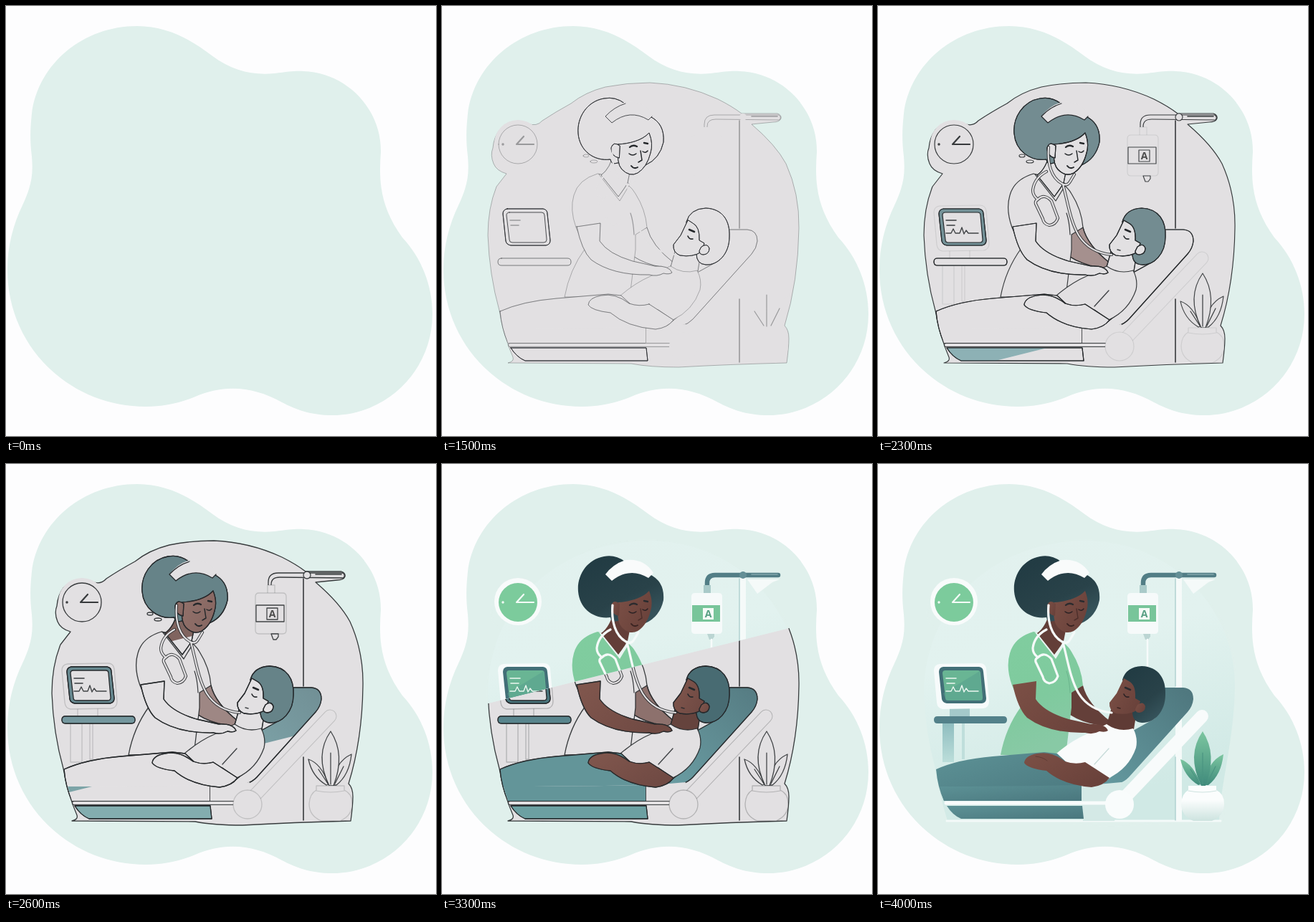
Recreate the animation shown at these times as an HTML page. Size 600x600 px, loop 7000 ms.

```html
<!DOCTYPE html>
<html lang="en">
<head>
<meta charset="utf-8">
<title>Bedside care</title>
<style>
html, body { margin: 0; width: 100%; height: 100%; overflow: hidden; background: #fdfdfe; }
svg { display: block; width: 100vw; height: 100vh; }
path { stroke-linecap: round; stroke-linejoin: round; }
.l1 { stroke-opacity: var(--l1); }
.l2 { stroke-opacity: var(--l2); }
.l3 { stroke-opacity: var(--l3); }
.l4 { stroke-opacity: var(--l4); }
.line { stroke: #25282b; stroke-width: var(--w); }
.tint { opacity: var(--tint); }
text { font: bold 14px "Open Sans", sans-serif; text-anchor: middle; }
</style>
</head>
<body>
<svg viewBox="0 0 600 600">
  <defs id="defs">
    <linearGradient id="room" x1="0" y1="0" x2=".25" y2="1">
      <stop offset="0" stop-color="#e2f1ee"/><stop offset=".45" stop-color="#e2f2ef"/><stop offset="1" stop-color="#d0e9e5"/>
    </linearGradient>
    <linearGradient id="hair" x1="0" y1="0" x2=".6" y2="1">
      <stop offset="0" stop-color="#203a42"/><stop offset=".7" stop-color="#294249"/><stop offset="1" stop-color="#35525a"/>
    </linearGradient>
    <linearGradient id="skin" x1="0" y1="0" x2="1" y2=".6">
      <stop offset="0" stop-color="#7c5046"/><stop offset="1" stop-color="#6a423b"/>
    </linearGradient>
    <linearGradient id="scrub" x1="0" y1="0" x2=".25" y2="1">
      <stop offset="0" stop-color="#80cd9f"/><stop offset=".6" stop-color="#7fca9e"/><stop offset="1" stop-color="#88c9a5"/>
    </linearGradient>
    <linearGradient id="teal" x1="0" y1="0" x2="1" y2="1">
      <stop offset="0" stop-color="#5d9296"/><stop offset="1" stop-color="#4a777e"/>
    </linearGradient>
    <linearGradient id="rest" x1="1" y1="0" x2="0" y2="1">
      <stop offset="0" stop-color="#4e767d"/><stop offset="1" stop-color="#649aa0"/>
    </linearGradient>
    <linearGradient id="leaf" x1="0" y1="0" x2="0" y2="1">
      <stop offset="0" stop-color="#7cc6a0"/><stop offset="1" stop-color="#3f8a7b"/>
    </linearGradient>
    <linearGradient id="pot" x1="0" y1="0" x2="0" y2="1">
      <stop offset=".4" stop-color="#fbfdfd"/><stop offset="1" stop-color="#cde3df"/>
    </linearGradient>
    <linearGradient id="leg" x1="0" y1="0" x2="0" y2="1">
      <stop offset="0" stop-color="#8fbdbf"/><stop offset="1" stop-color="#bcdeda"/>
    </linearGradient>
  </defs>
  <path fill="#e0f0ec" d="M183 28C225 28 258 47 287 69C316 91 345 97 375 94C395 91 408 90 415 91C475 93 524 143 523 204C520 245 522 280 553 323C580 352 595 390 595 430C595 508 532 571 455 571C425 571 404 563 385 553C345 531 305 527 262 546C240 555 218 559 195 559C88 559 2 475 2 368C2 335 10 305 23 278C36 250 38 235 36 210C33 185 34 170 36 150C45 80 108 28 183 28Z"/>
  <g id="sketch" clip-path="url(#wipe-base)"></g>
  <g id="art" clip-path="url(#wipe-color)"></g>
</svg>
<script>
const $ = id => document.getElementById(id);
const PAPER = '#e2e0e2', INK = '#25282b';
const SKIN = 'url(#skin)', HAIR = 'url(#hair)', TEAL = 'url(#teal)';
const sketch = [], art = [];

// Straight wipes sliding down: the edge starts at y = from (x = 0) at time t0.
const wipes = {
  base:  { t0: 400,  from: 170, speed: .8 },
  dark:  { t0: 1900, from: 272, speed: .66 },
  mid:   { t0: 2300, from: 360, speed: .4 },
  skin:  { t0: 2900, from: 440, speed: .45 },
  color: { t0: 2900, from: 190, speed: .4 }
};

// Closed area: outline in the drawing, optional tint, full colour in the end.
function area(d, fill, line, wipe, tint = fill) {
  sketch.push(`<path d="${d}" fill="${PAPER}" class="${line ? 'line l' + line : ''}"/>`);
  if (wipe) sketch.push(`<g clip-path="url(#wipe-${wipe})"><path class="tint" d="${d}" fill="${tint}"/></g>`,
    line ? `<path d="${d}" fill="none" class="line l${line}"/>` : '');
  art.push(`<path d="${d}" fill="${fill}"/>`);
}
// Thick stroke whose drawing shows both edges.
function tube(d, color, w, line) {
  sketch.push(`<path d="${d}" fill="none" stroke="${INK}" stroke-width="${w + 1}" class="l${line}"/>`,
    `<path d="${d}" fill="none" stroke="${PAPER}" stroke-width="${w - 1}"/>`);
  art.push(`<path d="${d}" fill="none" stroke="${color}" stroke-width="${w}"/>`);
}
function outline(d, line) {
  sketch.push(`<path d="${d}" fill="none" class="line l${line}"/>`);
}
function mark(d, color, w, line) {
  if (line) sketch.push(`<path d="${d}" fill="none" stroke="${INK}" stroke-width="${w}" class="l${line}"/>`);
  art.push(`<path d="${d}" fill="none" stroke="${color}" stroke-width="${w}"/>`);
}
const disc = (x, y, r, ry = r) => `M${x - r} ${y}a${r} ${ry} 0 1 1 ${2 * r} 0a${r} ${ry} 0 1 1 ${-2 * r} 0Z`;
const box = (x, y, w, h, r) =>
  `M${x + r} ${y}h${w - 2 * r}q${r} 0 ${r} ${r}v${h - 2 * r}q0 ${r} ${-r} ${r}h${2 * r - w}q${-r} 0 ${-r} ${-r}v${2 * r - h}q0 ${-r} ${r} ${-r}Z`;

// Room
const scene = 'M120 164Q132 169 140 160Q158 148 180 136Q200 120 228 113Q258 107 290 107Q340 109 385 130Q405 140 418 150H468Q474 152 473 157Q471 162 462 162L432 165Q466 194 480 220Q499 262 498 310Q497 385 478 446Q484 452 484 464Q484 476 481 498Q400 500 330 504Q290 504 264 499L92 498Q101 496 99 490Q86 460 80 425Q66 375 64 320Q64 282 76 252L90 234Q76 230 72 220Q67 208 71 198Q72 184 80 173Q92 160 108 161Z';
sketch.push(`<path d="${scene}" fill="${PAPER}" class="line l2"/>`);
art.push(`<path d="${scene}" fill="#e0f0ec" stroke="#e0f0ec" stroke-width="3"/>`,
  '<path d="M64 320C64 200 160 107 290 107C410 108 498 200 498 310C497 385 478 446 476 498H97Q84 455 80 425Q66 375 64 320Z" fill="url(#room)"/>',
  '<path d="M426 161H471L461 165L440 181Z" fill="#f5faf9"/>',
  '<path d="M96 498H478" stroke="#f4faf9" stroke-width="3"/>');

// Clock
area(disc(106, 192, 33), '#f8fbfb', 0);
area(disc(106, 193, 27), '#7ccb9c', 2);
mark('M128 193H104L114 182', '#f4fbf7', 2.2, 2);
mark(disc(85, 193, 1), '#f4fbf7', 1.5, 2);

// Monitor and shelf
area('M90 362H106V416H90Z', 'url(#leg)', 4);
area('M117 362H121V412H117Z', '#bfdedb', 4);
area('M100 336H128V353H100Z', '#a4c9ca', 4);
area('M86 279L142 278Q150 278 151 286L155 331Q155 340 147 341L90 342Q83 341 82 333L78 288Q78 280 86 279Z', '#f7fbfb', 4);
area('M91 283L141 283Q147 284 147 290L151 327Q151 333 145 334L96 334Q90 333 89 328L85 290Q85 284 91 283Z', '#426f77', 1, 'dark');
area('M94 288H139Q143 288 143 292L146 326Q146 330 142 330H98Q94 330 94 326L90 292Q90 288 94 288Z', '#69b594', 1);
art.push('<path d="M91 320L142 289L146 330H95Z" fill="#579e8d" opacity=".5"/>');
mark('M95 299H109M96 306H107', '#edf7f1', 1.6, 2);
mark('M95 317H102L105 311L108 317H114L117 309L120 318L123 313L126 317H140', '#edf7f1', 1.4, 3);
area(box(78, 352, 102, 10, 5), '#53818a', 2, 'mid');

// Drip stand
area('M415 159H424V498H415Z', '#f5faf9', 0);
mark('M415 160V310M415 409V497', '#b4d5d3', 1.6, 2);
mark('M370 178V166Q370 155 381 155H469', '#527e86', 6.5, 0);
outline('M366 180V165Q366 152 380 152H470Q474 155 471 159L382 158Q370 158 370 168V180Z', 2);
mark('M432 154H468', '#83a8ad', 1.6, 2);
area(disc(420, 155, 5), '#648f96', 3);
area('M365 169H375V182H365Z', '#a9cac9', 4);
area(box(348, 180, 43, 57, 5), '#f6fafa', 4);
area('M349 197H388V220H349Z', '#78c59a', 3);
area('M364 201H379V217H364Z', '#f5faf7', 3);
sketch.push('<text x="371.5" y="214" fill="#333" style="opacity:var(--l3)">A</text>');
art.push('<text x="371.5" y="214" fill="#579f83">A</text>');
area('M370 237H380V241L377 245H373Z', '#bbd5d3', 3);
mark('M376 245V285', '#f7fbfb', 2.5, 0);

// Plant
area('M447 448Q427 436 422 412Q440 418 450 447Z', 'url(#leaf)', 3);
area('M457 448Q458 416 482 405Q479 434 461 448Z', 'url(#leaf)', 3);
area('M451 449Q430 406 453 373Q474 405 457 449Z', 'url(#leaf)', 3);
mark('M453 447V403M449 446L436 426M459 446L471 422', '#4a9481', 1.2, 2);
area('M433 449H472V455Q483 460 483 474Q483 491 466 498H440Q423 491 423 474Q424 460 433 455Z', 'url(#pot)', 4);
mark('M433 456Q453 460 472 456', '#cfe3e0', 1.2, 4);

// Nurse: body and far arm
area('M269 316L286 309Q292 334 324 359L316 366L296 362Q274 356 260 344Z', '#643f39', 2, 'dark', '#8a6c68');
area('M217 234Q190 242 184 264Q178 284 187 309L200 338Q178 368 171 406H262L270 340V319L286 309Q284 284 270 262Q262 248 246 242Z', 'url(#scrub)', 2);
mark('M268 319Q267 300 263 289', '#6db78f', 1.2, 2);
area('M219 235L248 272L262 249L250 238Z', '#e9f4f1', 2);
area('M240 203Q235 227 222 236L246 266Q255 254 259 247L262 232Z', '#633e38', 2, 'skin');

// Nurse: head
area('M255 136Q242 126 226 129C202 133 188 156 190 178C192 202 212 217 235 214Q236 222 245 219Q270 215 284 222Q304 213 309 190Q311 164 290 154Q274 142 255 136Z', HAIR, 1, 'dark', '#41666d');
area('M246 193C261 192 279 188 289 177Q295 192 291 205Q286 225 273 233Q262 239 251 228Q243 220 246 193Z', SKIN, 1, 'skin');
area('M248 195Q239 188 236 198Q236 210 247 212Z', SKIN, 1, 'skin');
mark('M262 197Q266 193 272 196M282 191L287 192', '#2b2b2e', 2.4, 1);
mark('M261 206Q266 210 271 206M280 203Q284 206 287 202', '#2b2224', 1.5, 1);
mark('M277 202L279 215L274 218', '#4d2f2b', 1.5, 1);
mark('M264 223Q268 228 273 225', '#3b2422', 2, 1);
area('M228 154Q238 140 256 134Q282 131 295 152L288 159Q262 143 237 163Z', '#f9fbfb', 0);
outline('M256 136Q240 141 228 154L237 163Q262 143 288 159L293 154', 1);
outline(disc(201, 209, 4, 2), 2);
outline(disc(212, 217, 5, 2), 2);

// Patient: backrest, head, shirt
area('M398 312H426Q440 313 440 328Q439 338 432 346L350 437Q338 450 310 449L340 425L356 372L385 356Q401 342 398 312Z', 'url(#rest)', 2, 'mid');
area('M284 449L340 444L330 498H286Z', '#d4e9e6', 0);
area('M327 336L319 364Q336 380 357 370L361 345Z', '#5f3b35', 2, 'skin');
area('M341 301Q346 283 368 282C392 283 402 300 401 322C401 346 385 362 368 361Q355 360 355 346Z', HAIR, 1, 'dark', '#41666d');
area('M343 299L333 320L323 333Q322 344 332 348Q350 351 362 343L366 331L359 327Q360 308 350 303Z', SKIN, 1, 'skin');
area('M362 336Q370 330 373 338Q373 346 365 347Q359 347 359 342Z', SKIN, 1, 'skin');
mark('M345 312L352 315', '#2b2b2e', 2.6, 1);
mark('M343 321Q345 326 350 325', '#2b2224', 1.6, 1);
mark('M334 340L338 341', '#3b2422', 1.4, 3);
area('M319 363Q336 375 356 369Q363 382 360 396Q350 425 322 438L302 424L265 418L249 404Q270 386 291 377Z', '#f9fbfb', 2);
mark('M322 397L302 419', '#c9dcda', 1.4, 3);

// Bed and resting arm
area('M81 426Q112 412 160 408L232 402L250 404L266 419L284 448V470H92Q83 450 81 426Z', TEAL, 2, 'skin', '#5d9296');
area('M86 450Q180 450 284 448V470H92Z', TEAL, 0, 'mid', '#5d9296');
area('M96 477H285L287 495H116Q104 490 96 477Z', TEAL, 1, 'dark', '#679da0');
area('M289 416L323 438Q315 449 298 451Q258 448 235 428Q209 425 204 417Q205 407 222 404Q242 400 261 415Q275 420 289 416Z', SKIN, 2, 'skin');
mark('M220 408Q230 409 236 414', '#5f3b35', 1, 0);

// Near arm and stethoscope
area('M188 308L221 303L220 328Q232 346 266 356L297 363Q317 362 321 372Q317 375 309 373Q300 378 289 375Q238 376 208 354Q195 341 188 308Z', SKIN, 2, 'skin');
tube('M238 197C236 220 242 240 257 248M257 248Q264 252 268 245L274 235M258 249C264 270 268 300 280 320Q295 344 326 347', '#f5faf9', 3.2, 3);
tube('M235 231Q218 240 216 257Q216 264 222 269M223 270Q232 261 242 272L251 296Q248 305 239 306Q231 304 230 297L220 276Q219 272 223 270Z', '#f5faf9', 3.2, 3);

// Rail
tube('M340 470L452 352', '#f8fbfb', 18, 4);
tube('M95 473H330', '#f8fbfb', 5, 2);
area(disc(337, 475, 20), '#f9fcfc', 4);

$('defs').insertAdjacentHTML('beforeend',
  Object.keys(wipes).map(k => `<clipPath id="wipe-${k}"><polygon id="edge-${k}"/></clipPath>`).join(''));
$('sketch').innerHTML = sketch.join('');
$('art').innerHTML = art.join('');

const LOOP = 7000, STEP = 100;
const ramp = (t, a, b) => Math.min(1, Math.max(0, (t - a) / (b - a)));

function draw(t) {
  for (const k in wipes) {
    const { t0, from, speed } = wipes[k];
    const y = Math.min(760, from + speed * (t - t0));
    $('edge-' + k).setAttribute('points', `0,${y} 600,${y - 150} 600,-900 0,-900`);
  }
  const s = $('sketch').style;
  s.visibility = t >= 400 && t < 4000 ? 'visible' : 'hidden';
  s.opacity = ramp(t, 300, 800);
  s.setProperty('--l1', ramp(t, 700, 1200));
  s.setProperty('--l2', ramp(t, 900, 2300) * .9);
  s.setProperty('--l3', ramp(t, 1900, 2300) * .85);
  s.setProperty('--l4', ramp(t, 1900, 2900) * .25);
  s.setProperty('--w', .8 + .5 * ramp(t, 1700, 2500));
  s.setProperty('--tint', .58 + .37 * ramp(t, 1900, 3300));
  $('art').style.visibility = t >= 2900 ? 'visible' : 'hidden';
}

const start = performance.now();
function tick() {
  const t = (performance.now() - start) % LOOP;
  draw(Math.floor(t / STEP) * STEP);
  requestAnimationFrame(tick);
}
draw(0);
requestAnimationFrame(tick);
</script>
</body>
</html>
```
